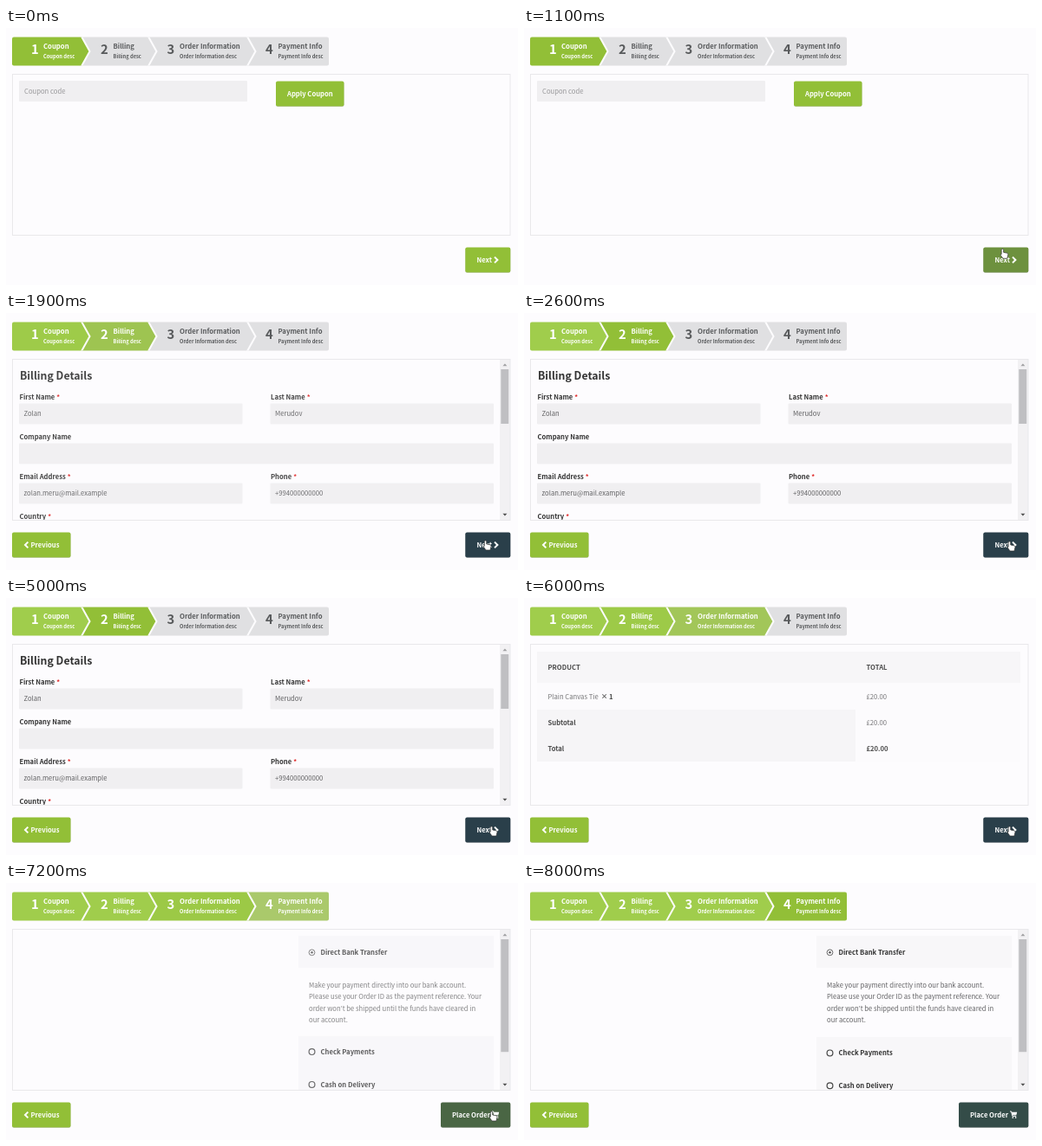
An HTML page with a canvas that plays this animation: 590 px wide and 297 px high, repeating every 8100 ms.

```html
<!DOCTYPE html>
<html lang="en">
<head>
<meta charset="utf-8">
<title>Checkout wizard</title>
<style>
  html, body { margin: 0; width: 100%; height: 100%; overflow: hidden; background: #fdfcfe; }
  canvas { display: block; width: 590px; height: 297px; }
</style>
</head>
<body>
<canvas></canvas>
<script>
const LOOP = 8100;
const PAGE = '#fdfcfe', BODY = '#626264', GREEN = '#92bf37';
const FONT = '"Noto Sans CJK JP","Noto Sans CJK SC","Noto Sans CJK KR","Noto Sans CJK",sans-serif';
const GREY = [224, 224, 226], ACTIVE = [146, 191, 55], DONE = [160, 205, 76], DARK = [42, 63, 74];

const canvas = document.querySelector('canvas');
const c = canvas.getContext('2d');
const scale = window.devicePixelRatio || 1;
canvas.width = 590 * scale;
canvas.height = 297 * scale;

// Each step: previous panel starts to leave, tabs switch, new panel starts to show.
const steps = [
  { leave: -1, swap: -1e4, show: -1e4 },
  { leave: 1200, swap: 1550, show: 1620 },
  { leave: 5600, swap: 5750, show: 5750 },
  { leave: 6900, swap: 7000, show: 7000 }
];
const tabs = [
  { num: 29, x: 43, left: 7, right: 87, name: 'Coupon' },
  { num: 109, x: 123.5, left: 87, right: 164, name: 'Billing' },
  { num: 185.5, x: 200, left: 164, right: 278, name: 'Order Information' },
  { num: 299, x: 313.5, left: 278, right: 372, name: 'Payment Info' }
];

const span = (t, from, length) => Math.min(1, Math.max(0, (t - from) / length));
const smooth = p => p * p * (3 - 2 * p);
const easeOut = p => 1 - (1 - p) ** 3;
const quick = p => 1 - (1 - p) ** 2.3;
const lerp = (a, b, p) => a + (b - a) * p;
const mix = (a, b, p) => `rgb(${a.map((v, i) => Math.round(lerp(v, b[i], p)))})`;

function text(str, x, y, color = '#333', weight = 700, size = 7.68) {
  c.font = `${weight} ${size}px ${FONT}`;
  c.fillStyle = color;
  c.fillText(str, x, y);
  return x + c.measureText(str).width;
}

function box(x, y, w, h, color, radius = 0) {
  c.fillStyle = color;
  c.beginPath();
  c.roundRect(x, y, w, h, radius);
  c.fill();
}

function shape(points, color) {
  c.fillStyle = color;
  c.beginPath();
  points.forEach(([x, y]) => c.lineTo(x, y));
  c.fill();
}

function line(points, color, width) {
  c.strokeStyle = color;
  c.lineWidth = width;
  c.beginPath();
  points.forEach(([x, y]) => c.lineTo(x, y));
  c.stroke();
}

function button(x, y, w, h, color) {
  box(x, y + 0.6, w, h, 'rgba(0,0,0,.2)', 2.5);
  box(x, y, w, h, color, 2);
}

const chevron = (x, y, dir) =>
  line([[x, y - 3.4], [x + 3.4 * dir, y], [x, y + 3.4]], '#fff', 2);

function cart(x, y) {
  line([[x, y], [x + 1.6, y], [x + 2.8, y + 5.4], [x + 7.2, y + 5.4]], '#fff', 1);
  shape([[x + 1.8, y + 0.8], [x + 8.2, y + 0.8], [x + 7.3, y + 4.2], [x + 2.5, y + 4.2]], '#fff');
  for (const dx of [3.3, 6.6]) box(x + dx - 0.9, y + 6.2, 1.8, 1.8, '#fff', 0.9);
}

function drawTabs(t, current) {
  c.save();
  c.beginPath();
  c.roundRect(7, 10.4, 365, 33.2, 2);
  c.clip();
  for (let i = 3; i >= 0; i--) {
    const { left, right, num, x, name } = tabs[i];
    const turnOn = quick(span(t, steps[i].show, 500));
    const turnOff = i < 3 ? quick(span(t, steps[i + 1].show, 500)) : 0;
    const fill = turnOff ? mix(ACTIVE, DONE, turnOff) : mix(GREY, ACTIVE, turnOn);
    const tip = i < 3 ? 9.5 : 0;
    shape([[left, 10], [right, 10], [right + tip, 27], [right, 44], [left, 44]], fill);
    const color = i <= current ? '#fff' : '#585a5c';
    text(i + 1, num, 30.4, color, 700, 14.8);
    text(name, x, 23.9, color, 700, 7.75);
    text(name + ' desc', x, 35, color, 700, 5.75);
  }
  for (const { right } of tabs.slice(0, 3))
    line([[right - 0.5, 9], [right + 9.5, 27], [right - 0.5, 45]], PAGE, 2);
  c.restore();
}

function coupon() {
  box(15, 61, 263, 24, '#f0eff1', 1);
  text('Coupon code', 21, 76.4, '#98989a', 400);
  button(311, 61.5, 78.5, 29, GREEN);
  text('Apply Coupon', 324, 79.2, '#fff');
}

function field(label, x, y, w, value = '', required = true) {
  const end = text(label, x + 0.5, y);
  if (required) text('*', end + 2, y, '#e02b2b');
  box(x, y + 4, w, 24, '#f0eff1', 1);
  text(value, x + 5.5, y + 19, BODY, 400);
}

function billing() {
  text('Billing Details', 16, 76.7, '#333', 700, 12.3);
  field('First Name', 15, 100.4, 257.5, 'Zolan');
  field('Last Name', 304.5, 100.4, 257.5, 'Merudov');
  field('Company Name', 15, 146.4, 547, '', false);
  field('Email Address', 15, 192.4, 257.5, 'zolan.meru@mail.example');
  field('Phone', 304.5, 192.4, 257.5, '+994000000000');
  field('Country', 15, 238.4, 257.5);
}

function order() {
  box(15, 62, 557, 36, '#f6f5f7');
  box(15, 98, 557, 31, '#fcfbfd');
  box(15, 129, 367, 60, '#f5f4f6');
  box(382, 129, 190, 60, '#fcfbfd');
  text('PRODUCT', 27.5, 83);
  text('TOTAL', 394.5, 83);
  const end = text('Plain Canvas Tie', 27.5, 116.8, BODY, 400);
  text('× 1', end + 3, 116.8);
  text('Subtotal', 27.5, 146.9);
  text('Total', 27.5, 177);
  text('£20.00', 394.5, 116.8, BODY, 400);
  text('£20.00', 394.5, 146.9, BODY, 400);
  text('£20.00', 394.5, 177);
}

function option(label, y, checked) {
  c.strokeStyle = '#444';
  c.lineWidth = checked ? 0.8 : 1.2;
  c.beginPath();
  c.arc(352.5, y, 3.4, 0, 7);
  c.stroke();
  if (checked) box(351.2, y - 1.3, 2.6, 2.6, '#555', 1.3);
  text(label, 362.5, y + 3);
}

function payment(shown) {
  const shift = -6 * (1 - shown);
  box(337, 61, 225, 37, '#f8f7f9');
  option('Direct Bank Transfer', 80.3, true);
  ['Make your payment directly into our bank account.',
   'Please use your Order ID as the payment reference. Your',
   'order won’t be shipped until the funds have cleared in',
   'our account.'].forEach((row, i) => text(row, 349, 121 + i * 13.3, BODY, 400));
  box(337, 178 + shift, 225, 70, '#f8f7f9');
  option('Check Payments', 196.4 + shift);
  option('Cash on Delivery', 234.2 + shift);
}

const panels = [coupon, billing, order, payment];

function scrollbar(thumb) {
  box(569, 54, 12, 185, '#f2f1f3');
  box(570.3, 65, 8.9, thumb, '#bfbfc2');
  for (const [y, d, color] of [[60, -1, '#a0a0a2'], [233, 1, '#505050']])
    shape([[572.4, y - d * 1.2], [577.4, y - d * 1.2], [574.9, y + d * 1.5]], color);
}

function drawPanel(t, current) {
  c.save();
  c.beginPath();
  c.rect(8, 54, 573, 185);
  c.clip();
  const shown = easeOut(span(t, steps[current].show, 500));
  const next = steps[current + 1];
  c.globalAlpha = shown * (next ? 1 - span(t, next.leave, next.swap - next.leave) : 1);
  panels[current](shown);
  c.globalAlpha = 1;
  if (current === 1) scrollbar(63);
  if (current === 3) scrollbar(130.3);
  c.restore();
  c.strokeStyle = '#e9e8eb';
  c.lineWidth = 1;
  c.strokeRect(7.5, 53.5, 573.5, 186);
}

function drawButtons(t, current) {
  if (current > 0) {
    button(7, 253.5, 67.5, 29, GREEN);
    chevron(25.4, 268, -1);
    text('Previous', 28.5, 271, '#fff');
  }
  if (current < 3) {
    button(529.3, 253.5, 52, 29, mix(ACTIVE, DARK, smooth(span(t, 1000, 250))));
    text('Next', 542.5, 271, '#fff');
    chevron(563, 268, 1);
  } else {
    const hover = quick(span(t, 7000, 500)) - 0.1 * span(t, 7850, 150);
    button(501, 253.5, 80.3, 29, mix(ACTIVE, DARK, hover));
    text('Place Order', 514, 271, '#fff');
    cart(560, 264);
  }
}

const hand = new Path2D('M2.5 0Q3.7 0 3.7 1.2V4L7.5 4.8Q9 5 9 6.5L8 11H3L.2 7Q0 6 1.3 6.2V1.2Q1.3 0 2.5 0Z');
const arrow = new Path2D('M0 0V10L2.4 7.8L4 11.4L5.6 10.6L4 7.2H7.2Z');

function drawCursor(t) {
  if (t < 350 || t > 7850) return;
  const come = smooth(span(t, 350, 850));
  const nudge = smooth(span(t, 2400, 200));
  const x = lerp(520, 550, come) + 7 * nudge;
  const y = lerp(57, 263, come) + nudge;
  const pointer = y > 253 ? hand : arrow;
  c.save();
  c.translate(x, y);
  c.fillStyle = '#fff';
  c.strokeStyle = '#333';
  c.lineWidth = 0.7;
  c.fill(pointer);
  c.stroke(pointer);
  c.restore();
}

function draw(now) {
  const t = now % LOOP;
  const current = steps.filter(s => t >= s.swap).length - 1;
  c.setTransform(scale, 0, 0, scale, 0, 0);
  box(0, 0, 590, 297, PAGE);
  drawTabs(t, current);
  drawPanel(t, current);
  drawButtons(t, current);
  drawCursor(t);
}

const start = performance.now();
function tick() {
  draw(performance.now() - start);
  requestAnimationFrame(tick);
}
tick();
</script>
</body>
</html>
```
